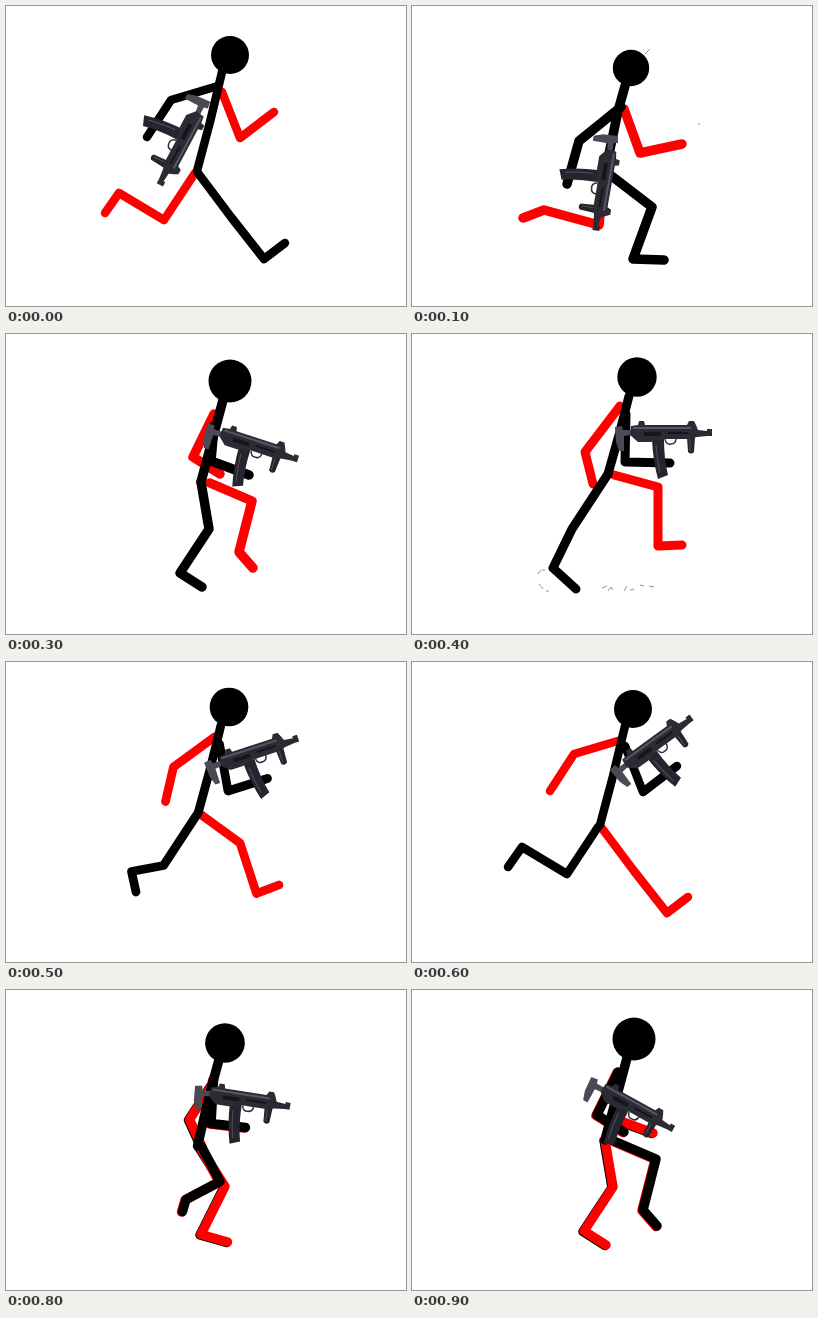
These frames come from a looping animation (400x300 px, 1000 ms). An HTML page:

```html
<!DOCTYPE html>
<html lang="en">
<head>
<meta charset="utf-8">
<title>Running stick figure</title>
<style>
  html, body { margin: 0; width: 100%; height: 100%; overflow: hidden; background: #fff; }
  svg { display: block; width: 100vw; height: 100vh; }
  .pose { visibility: hidden; animation: show 1s step-end infinite; }
  .pose polyline { fill: none; stroke-linecap: round; stroke-linejoin: round; }
  .specks { fill: none; stroke: #777; stroke-width: .8; }
  @keyframes show {
    0% { visibility: visible; }
    10%, 100% { visibility: hidden; }
  }
</style>
</head>
<body>
<svg id="stage" viewBox="0 0 400 300">
  <defs>
    <g id="gun">
      <path fill="#4a4a56" d="M-47-7l7-1 1 4 10 0v5l-9 1 0 15-5 0-3-9z"/>
      <path fill="#25252d" d="M-10 5h12q0 20 4 36l-10 4q-5-18-6-40z"/>
      <path fill="#24242c" d="M25 3h8l-1 15q-3 3-6 0z"/>
      <path fill="none" stroke="#30303a" stroke-width="1.5" d="M3 5q1 6 6 5 5 0 5-6"/>
      <path fill="#2b2b34" d="M-31-8l7-1 1-4h5l1 4 42 0 2-4h5l2 4 2 5 9 1v-2h5v7h-5l-10 1-7 2h-26l-13 3h-13l-8-7z"/>
      <path fill="#565666" d="M-29-7h58v2h-58z"/>
      <path fill="#15151b" d="M-18-2h17v4h-17zM6-2h20v2h-20z"/>
      <path fill="none" stroke="#51515f" d="M-6 11q1 14 4 28M28 5v12"/>
    </g>
  </defs>
</svg>
<script>
const RED = '#f00', BLACK = '#000';

// Key poses of the half cycle; limb a leads in the first half, b in the second.
const stride = {
  w: 8.5, r: 19, head: [[224, 49]],
  spine: [[216, 66], [204, 116], [191, 165]],
  armA: [[212, 80], [165, 94], [141, 131]],
  armB: [[216, 86], [234, 132], [268, 106]],
  legA: [[192, 167], [225, 211], [258, 253], [279, 237]],
  legB: [[189, 167], [158, 214], [113, 187], [99, 207]]
};
const land = {
  w: 9.5, r: 18.2, head: [[219, 62]],
  spine: [[213, 80], [206, 105], [193, 167]],
  armA: [[209, 101], [167, 135], [155, 178]],
  armB: [[212, 103], [228, 147], [270, 138]],
  legA: [[197, 168], [240, 201], [221, 253], [252, 254]],
  legB: [[192, 167], [187, 219], [132, 204], [111, 212]]
};
const pass = {
  w: 9.5, r: 21.5, head: [[224, 47]],
  spine: [[217, 66], [206, 107], [195, 148]],
  armA: [[208, 92], [205, 127], [243, 141]],
  armB: [[208, 80], [187, 123], [214, 140]],
  legA: [[195, 148], [203, 195], [174, 239], [196, 253]],
  legB: [[204, 149], [246, 167], [233, 218], [247, 234]]
};
const lift = {
  w: 9, r: 19.7, head: [[225, 43]],
  spine: [[217, 62], [207, 101], [196, 140]],
  armA: [[214, 80], [213, 128], [258, 129]],
  armB: [[208, 72], [173, 118], [181, 150]],
  legA: [[196, 140], [160, 195], [141, 234], [164, 255]],
  legB: [[202, 141], [246, 153], [246, 212], [270, 211]]
};

const partner = { armA: 'armB', armB: 'armA', legA: 'legB', legB: 'legA' };
const withGun = (pose, ...gun) => ({ ...pose, gun: [gun] });

function swap(pose, dx, dy) {
  const out = {};
  for (const key in pose) {
    const part = pose[partner[key] || key];
    out[key] = Array.isArray(part) ? part.map(([x, y]) => [x + dx, y + dy]) : part;
  }
  return out;
}

function mid(p, q) {
  const mix = (a, b) => Array.isArray(a) ? a.map((v, i) => mix(v, b[i])) : (a + b) / 2;
  return Object.fromEntries(Object.keys(p).map(key => [key, mix(p[key], q[key])]));
}

const run0 = withGun(stride, 176, 134, 118);
const run1 = withGun(land, 191, 175, 100);
const run3 = withGun(pass, 244, 111, 18);
const run4 = withGun(lift, 250, 100, 0);
const run6 = withGun(swap(stride, -3, -2), 240, 86, -36);
const run7 = withGun(swap(land, -3, -5), 252, 104, -11);
const run9 = withGun(swap(pass, -2, 2), 217, 116, 29);

const cycle = [
  run0, run1, mid(run1, run3), run3, run4,
  mid(run4, run6), run6, run7, mid(run7, run9), run9
];

const specks = {
  1: 'M233 48l5-5M286 118h2',
  4: 'M126 240l3-4M130 236h3M127 250l4 5M134 257h3M190 254l5-2M196 257l3-4 2 3M212 257l3-5M218 256l4-1M228 251l4 1M237 252l5 1',
  7: 'M232 48l4-4M80 113h2'
};

const line = (pts, color, w, shift = 0) =>
  `<polyline points="${pts.map(([x, y]) => [x - shift, y + shift / 2]).join(' ')}" stroke="${color}" stroke-width="${w}"/>`;

function draw(p, i) {
  const fringe = i >= 7 ? 1 : 0;
  const limb = (pts, color) =>
    (fringe ? line(pts, color === RED ? BLACK : RED, p.w, fringe) : '') + line(pts, color, p.w);
  const [[hx, hy]] = p.head, [[gx, gy, turn]] = p.gun;
  return `<g class="pose" style="animation-delay:${i * 100 - 1000}ms">
    ${limb(p.armB, RED)}${limb(p.legB, RED)}
    ${limb(p.armA, BLACK)}${limb(p.legA, BLACK)}${line(p.spine, BLACK, p.w)}
    <circle cx="${hx}" cy="${hy}" r="${p.r}"/>
    <path class="specks" d="${specks[i] || ''}"/>
    <use href="#gun" transform="translate(${gx} ${gy}) rotate(${turn})"/>
  </g>`;
}

document.getElementById('stage').insertAdjacentHTML('beforeend', cycle.map(draw).join(''));
</script>
</body>
</html>
```
